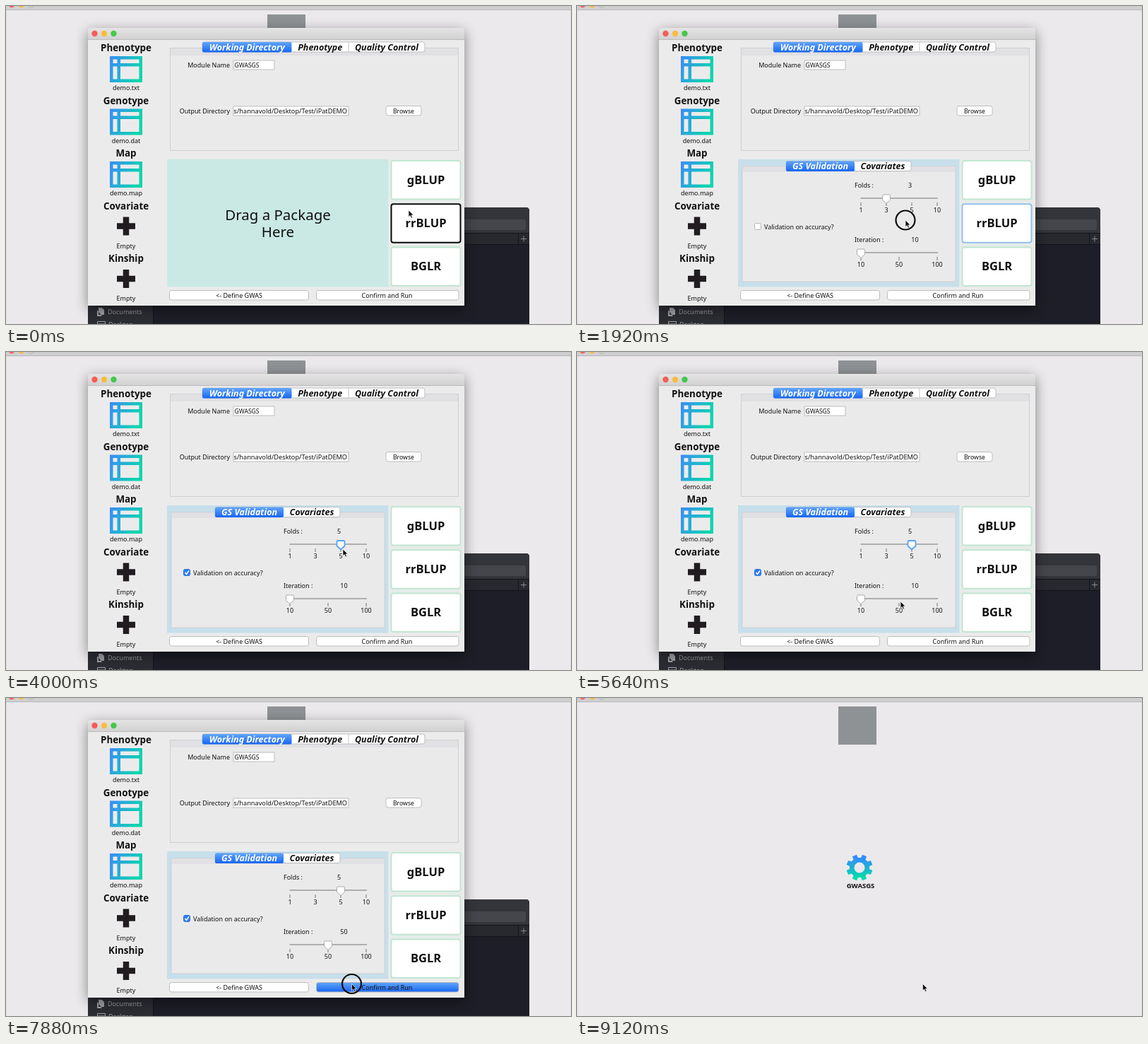
Recreate the animation shown at these times as an HTML page. Size 800x450 px, loop 9160 ms.

```html
<!DOCTYPE html>
<html lang="en">
<head>
<meta charset="utf-8">
<title>Package setup</title>
<style>
  html, body { margin: 0; width: 100%; height: 100%; overflow: hidden; background: #ebe9eb; }
  svg { display: block; width: 800px; height: 450px; font: 9px "Noto Sans", "Open Sans", sans-serif; fill: #111; }
  .mid { text-anchor: middle; }
  .end { text-anchor: end; }
  .head { font-size: 13.4px; font-weight: 700; text-anchor: middle; }
  .tab { font-size: 12.5px; font-weight: 700; font-style: italic; text-anchor: middle; }
  .pack { font-size: 16.5px; font-weight: 700; text-anchor: middle; }
  .big { font-size: 20.5px; text-anchor: middle; }
  .box { fill: #fff; stroke: #bdbdbf; }
  .group { fill: #ebeaeb; stroke: #cfced0; }
  .line { stroke: #9b9b9d; stroke-width: 1.6; }
  .tick { stroke: #777; }
  .thumb { fill: #fff; stroke: #aaa; }
  .thumb.focus { stroke: #58a2ee; stroke-width: 1.8; }
  .card { fill: #fff; stroke: #c2e6d2; stroke-width: 2; }
  .card.held { stroke: #080808; }
  .card.dropped { stroke: #93c0ee; }
  .dialog { filter: drop-shadow(0 5px 9px rgba(0, 0, 0, .45)); }
</style>
</head>
<body>
<svg viewBox="0 0 800 450">
  <defs>
    <linearGradient id="bar" x2="0" y2="1"><stop stop-color="#e5e4e5"/><stop offset="1" stop-color="#d2d1d2"/></linearGradient>
    <linearGradient id="blue" x2="0" y2="1"><stop stop-color="#62a5fa"/><stop offset="1" stop-color="#1766f2"/></linearGradient>
    <linearGradient id="icon" x2="1" y2=".35"><stop stop-color="#3a8bf8"/><stop offset="1" stop-color="#0cd6ad"/></linearGradient>
    <linearGradient id="gearFill" x2="0" y2="1"><stop offset=".15" stop-color="#318efb"/><stop offset=".9" stop-color="#04dda9"/></linearGradient>
    <clipPath id="pathClip"><rect x="323" y="142" width="161" height="13"/></clipPath>
  </defs>

  <rect width="800" height="450" fill="#ebe9eb"/>
  <rect width="800" height="5" fill="#cfcecf"/>
  <path d="M0 5.5H800" stroke="#b9b8ba"/>
  <path d="M.5 6V450M799.5 6V450" stroke="#dddcde"/>
  <circle cx="8" cy="-2" r="4.2" fill="#f4605a"/>
  <circle cx="21.5" cy="-2" r="4.2" fill="#f6bd3c"/>
  <circle cx="35" cy="-2" r="4.2" fill="#cfced0" stroke="#b5b4b6"/>
  <rect x="370" y="12" width="54" height="54" fill="#8f9295"/>

  <g id="result">
    <path id="gear" fill="url(#gearFill)" fill-rule="evenodd"/>
    <text class="mid" x="401.5" y="268.5" font-size="9.5" font-weight="600">GWASGS</text>
  </g>

  <g id="setup">
    <g>
      <path d="M116 450V290q0-5 5-5H736q5 0 5 5V450z" fill="#1d1e27"/>
      <path d="M116 322V290q0-5 5-5H736q5 0 5 5V322z" fill="#34353a"/>
      <rect x="560" y="302" width="176" height="15" rx="3" fill="#45464b"/>
      <rect x="116" y="322" width="625" height="15" fill="#28292f"/>
      <path d="M116 321.5H741M116 337.5H741M725.5 322V337" stroke="#14151a"/>
      <path d="M729 329.5h8M733 325.5v8" stroke="#85868a"/>
      <rect x="116" y="424" width="92" height="26" fill="#2c2d33"/>
      <path d="M208.5 424V450" stroke="#131419"/>
      <path d="M131 427h5l3 3v7h-8zM129 430v9h7" fill="#a0a1a5"/>
      <path d="M129.5 446.5h11V450h-11z" fill="none" stroke="#a0a1a5"/>
      <g fill="#98999d"><text x="144" y="436">Documents</text><text x="145" y="454">Desktop</text></g>
    </g>

    <g class="dialog">
      <path d="M116 424V36q0-5 5-5H644q5 0 5 5V424z" fill="#ecebec"/>
      <path d="M116 47V36q0-5 5-5H644q5 0 5 5V47z" fill="url(#bar)"/>
    </g>
    <path d="M116 47.5H649" stroke="#bcbbbd"/>
    <circle cx="125.5" cy="39" r="4.2" fill="#f55d56"/>
    <circle cx="139" cy="39" r="4.2" fill="#f7bd3b"/>
    <circle cx="152.5" cy="39" r="4.2" fill="#44c84c"/>

    <g id="side"></g>

    <rect class="group" x="232.5" y="59.5" width="408" height="145"/>
    <rect x="233" y="60" width="407" height="10" fill="#e1e0e2"/>
    <g id="topTabs"></g>
    <text class="end" x="317" y="87">Module Name</text>
    <rect class="box" x="322" y="77" width="58" height="13"/>
    <text x="323.5" y="87" font-size="8.6">GWASGS</text>
    <text class="end" x="317" y="152">Output Directory</text>
    <rect class="box" x="322" y="142" width="163" height="13"/>
    <g clip-path="url(#pathClip)"><text class="end" x="483" y="152" font-size="9.2">s/hannavold/Desktop/Test/iPatDEMO</text></g>
    <rect class="box" x="538" y="141.5" width="50" height="13.5" rx="3"/>
    <text class="mid" x="563" y="152" font-size="8.7">Browse</text>

    <rect id="zone" x="228" y="217" width="313.5" height="180.5"/>
    <g id="prompt">
      <text class="big" x="385" y="303">Drag a Package</text>
      <text class="big" x="385" y="327">Here</text>
    </g>
    <g id="options">
      <rect class="group" x="234" y="227" width="302" height="163"/>
      <rect x="235" y="228" width="300" height="7" fill="#e1e0e2"/>
      <g id="lowTabs"></g>
      <rect id="check" x="251.5" y="307.5" width="9" height="9" rx="2"/>
      <path id="mark" d="M253.500 312l2 2.500 3.500-5" fill="none" stroke="#fff" stroke-width="1.5"/>
      <text x="265" y="315.5">Validation on accuracy?</text>
      <text x="393" y="257">Folds :</text>
      <text id="foldsText" class="mid" x="471.5" y="257"></text>
      <text x="393" y="334">Iteration :</text>
      <text id="iterText" class="mid" x="478.5" y="334"></text>
      <g id="scales"></g>
      <path id="folds" class="thumb"/>
      <path id="iter" class="thumb"/>
    </g>

    <rect x="544" y="217" width="102" height="181" fill="#e6ece9"/>
    <g id="cards"></g>
    <rect class="box" x="231.5" y="402.5" width="197" height="13.5" rx="3"/>
    <text class="mid" x="330" y="412.5">&lt;- Define GWAS</text>
    <rect id="run" class="box" x="439.5" y="402.5" width="201.5" height="13.5" rx="3"/>
    <text class="mid" x="539.5" y="412.5">Confirm and Run</text>
  </g>

  <g id="pointer">
    <circle id="ring" r="13.5" fill="none" stroke="#0b0b0b" stroke-width="2.2"/>
    <path d="M0 0V9.500l2.200-2 1.600 3.500 1.700-.8-1.600-3.300h3z" fill="#0a0a0a" stroke="#f5f5f5" stroke-width=".7"/>
  </g>
</svg>
<script>
const LOOP = 9160;
const $ = id => document.getElementById(id);
const show = (id, on) => $(id).style.display = on ? '' : 'none';
const within = (t, a, b) => t >= a && t < b;

function sidePanel() {
  const files = [['Phenotype', 'demo.txt'], ['Genotype', 'demo.dat'], ['Map', 'demo.map'], ['Covariate'], ['Kinship']];
  return files.map(([name, file], i) => {
    const icon = file
      ? '<path d="M147 71h46v37h-46zM151.5 75.5v5.5h6v-5.5zM162 75.5v5.5h26.5v-5.5zM151.5 85.5v18h6v-18zM162 85.5v18h26.5v-18z" fill="url(#icon)" fill-rule="evenodd"/>'
      : '<path d="M157 88h26M170 75v26" stroke="#211c20" stroke-width="8.5"/>';
    return `<g transform="translate(0 ${i * 74.5})"><text class="head" x="170" y="64">${name}</text>${icon}
      <text class="mid" x="170" y="119">${file || 'Empty'}</text></g>`;
  }).join('');
}

function tabs(y, edges, names) {
  const left = edges[0], right = edges[edges.length - 1];
  return `<rect class="box" x="${left}" y="${y}" width="${right - left}" height="14" rx="3"/>
    <rect x="${left}" y="${y}" width="${edges[1] - left}" height="14.5" rx="2" fill="url(#blue)"/>` +
    names.map((name, i) => `<text class="tab" x="${(edges[i] + edges[i + 1]) / 2}" y="${y + 11.5}" fill="${i ? '#111' : '#fff'}">${name}</text>` +
      (i > 1 ? `<path d="M${edges[i]} ${y}v14" stroke="#c4c4c6"/>` : '')).join('');
}

function scale(y, labels) {
  const step = 108 / (labels.length - 1);
  return `<path class="line" d="M401.5 ${y}H511"/>` + labels.map((label, i) => {
    const x = 402 + i * step;
    return `<path class="tick" d="M${x} ${y + 6}v5"/><text class="mid" x="${x}" y="${y + 20}">${label}</text>`;
  }).join('');
}

function gearPath() {
  const at = (r, deg) => {
    const a = deg * Math.PI / 180;
    return `${(400 + r * Math.sin(a)).toFixed(2)} ${(240 - r * Math.cos(a)).toFixed(2)}`;
  };
  const points = [];
  for (let k = 0; k < 8; k++) {
    const mid = 22.5 + k * 45;
    points.push(at(14.2, mid - 14), at(18.8, mid - 10), at(18.8, mid + 10), at(14.2, mid + 14));
  }
  return `M${points.join('L')}ZM392.5 240a7.5 7.5 0 1 0 15 0a7.5 7.5 0 1 0-15 0Z`;
}

$('side').innerHTML = sidePanel();
$('topTabs').innerHTML = tabs(51, [278, 404.5, 485, 593], ['Working Directory', 'Phenotype', 'Quality Control']);
$('lowTabs').innerHTML = tabs(219.5, [296, 393, 473], ['GS Validation', 'Covariates']);
$('scales').innerHTML = scale(272, [1, 3, 5, 10]) + scale(349, [10, 50, 100]);
$('cards').innerHTML = ['gBLUP', 'rrBLUP', 'BGLR'].map((name, i) => {
  const y = 219 + i * 61.3;
  return `<rect id="card${i}" class="card" x="545.5" y="${y}" width="98" height="54.5" rx="3"/>
    <text class="pack" x="594.5" y="${y + 32.8}">${name}</text>`;
}).join('');
$('gear').setAttribute('d', gearPath());

// Pointer stops: time, x, y
const route = [
  [0, 570, 289], [500, 576, 297], [700, 576, 297], [1550, 465, 303], [2050, 465, 303],
  [2650, 257, 311], [2950, 257, 311], [3350, 438, 274], [3500, 438, 274], [3820, 474, 276],
  [4000, 477, 279], [4800, 477, 279], [5500, 458, 353], [5700, 458, 353], [6100, 402, 350],
  [6250, 402, 350], [6850, 456, 351], [7050, 456, 351], [7550, 489.5, 404.5], [LOOP, 489.5, 404.5]
];
const presses = [[560, 1960], [2740, 2900], [3420, 3900], [6150, 6980], [7740, 8040]];

function pointerAt(t) {
  const i = route.findIndex(stop => stop[0] > t);
  const [t0, x0, y0] = route[i - 1], [t1, x1, y1] = route[i];
  const p = (t - t0) / (t1 - t0), e = p * p * (3 - 2 * p);
  return [x0 + (x1 - x0) * e, y0 + (y1 - y0) * e];
}

function slide(id, x, y, focus) {
  $(id).setAttribute('d', `M${x - 5.5} ${y - 4}q0-1.5 1.5-1.5h8q1.5 0 1.5 1.5v6l-5.5 5-5.5-5z`);
  $(id).classList.toggle('focus', focus);
}

function render(t) {
  const [x, y] = pointerAt(t);
  const dropped = t >= 1840, checked = t >= 2840, done = t >= 8320;
  const dragX = (a, b, from, to) => t < a ? from : t < b ? Math.max(from, Math.min(to, x)) : to;

  $('pointer').setAttribute('transform', `translate(${x} ${y})`);
  show('ring', presses.some(([a, b]) => within(t, a, b)));
  show('setup', !done);
  show('result', done);
  show('prompt', !dropped);
  show('options', dropped);
  $('zone').setAttribute('fill', dropped ? '#c7dfea' : '#cae9e4');
  $('card1').setAttribute('class', 'card' + (!dropped ? ' held' : t < 2300 ? ' dropped' : ''));

  show('mark', checked);
  $('check').setAttribute('fill', checked ? '#2d7ff5' : '#fff');
  $('check').setAttribute('stroke', checked ? '#2471e4' : '#b4b4b6');

  const foldX = dragX(3420, 3900, 438, 474), iterX = dragX(6150, 6980, 402, 456);
  slide('folds', foldX, 272.5, within(t, 3420, 6150));
  slide('iter', iterX, 349.5, within(t, 6150, 7740));
  $('foldsText').textContent = Math.round(3 + (foldX - 438) / 18);
  $('iterText').textContent = Math.round(10 + (iterX - 402) / 54 * 40);
  $('run').style.fill = within(t, 7740, 8080) ? 'url(#blue)' : '';
  $('gear').setAttribute('transform', `rotate(${(9120 - t) * .073} 400 240)`);
}

const start = performance.now();
function tick() {
  render((performance.now() - start) % LOOP);
  requestAnimationFrame(tick);
}
tick();
</script>
</body>
</html>
```
